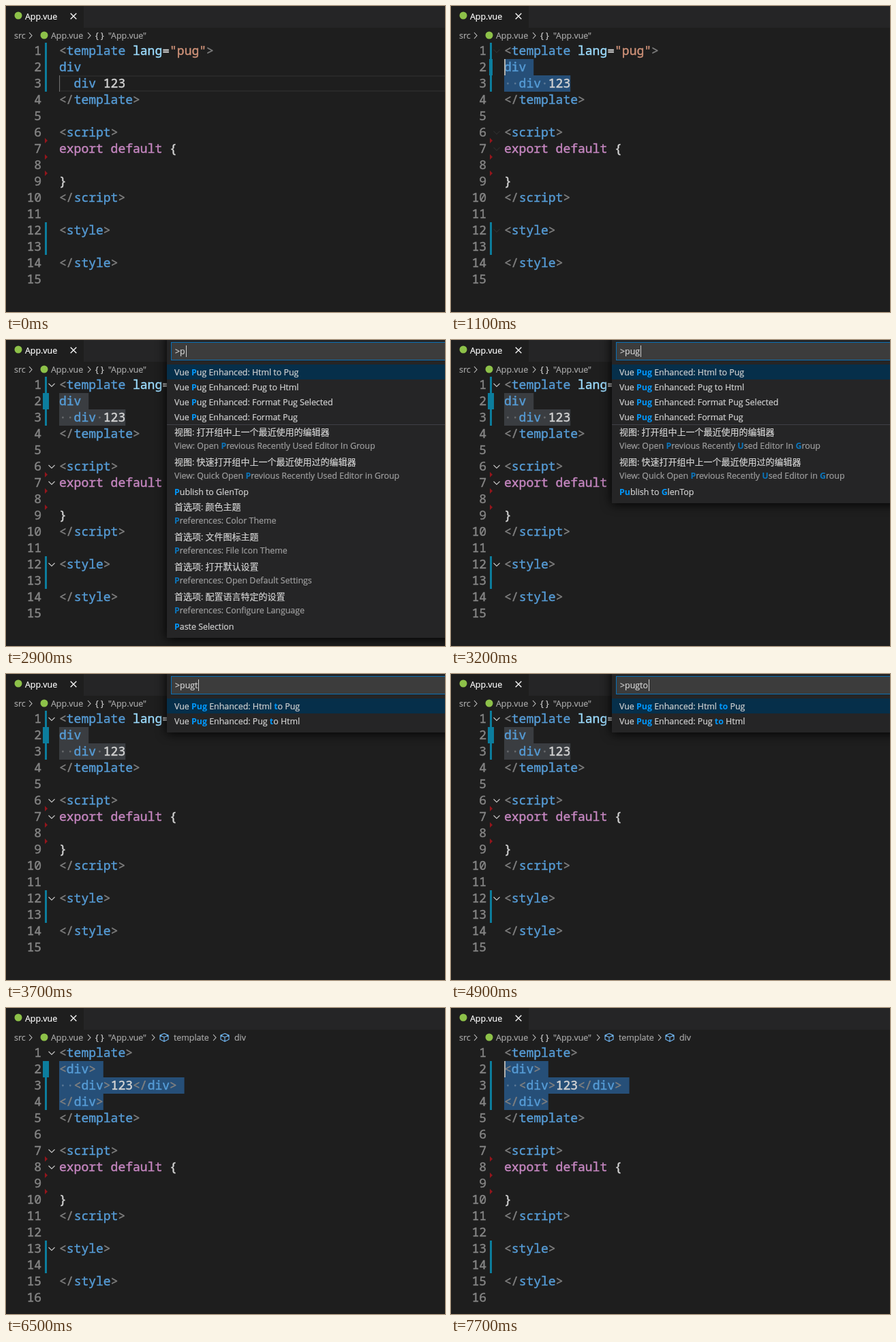
An HTML page that plays this animation: 644x450 px, repeating every 8.1 s.

```html
<!DOCTYPE html>
<html lang="en">
<head>
<meta charset="utf-8">
<title>Editor demo</title>
<style>
  html, body { margin: 0; width: 100%; height: 100%; overflow: hidden; background: #1e1e1e; }
  svg { display: block; width: 644px; height: 450px; }
  text { white-space: pre; font: 12.4px "Open Sans", "Noto Sans", "Noto Sans CJK SC", sans-serif; color: #d4d4d4; }
  text, tspan { fill: currentColor; stroke: currentColor; stroke-width: .2; }
  .cjk { font: 13px "Noto Sans CJK SC", "Noto Sans CJK", sans-serif; }
  .code, .code tspan { font: 500 18px "Noto Sans Mono", "DejaVu Sans Mono", monospace; stroke-width: .45; }
  .gray { color: #808080; } .blue { color: #569cd6; } .attr { color: #9cdcfe; } .str { color: #ce9178; }
  .key { color: #c586c0; } .plain { color: #d4d4d4; } .num { color: #858585; text-anchor: end; }
  .crumb { color: #a9a9a9; } .bright { color: #fff; }
  .hit { font-weight: 700; color: #0097fb; stroke: none; }
  .detail { opacity: .7; }
  .line { fill: none; stroke: #c5c5c5; stroke-width: 1.1; }
  .panel { filter: drop-shadow(0 1px 8px #000); fill: #252526; }
</style>
</head>
<body>
<svg viewBox="0 0 644 450"><g id="editor"></g><g id="palette"></g></svg>
<script>
const LOOP = 8100, LEFT = 78, CHAR = 10.8, ROW = 24, TOP = 54;
const editor = document.getElementById('editor');
const palette = document.getElementById('palette');

const esc = s => s.replace(/&/g, '&amp;').replace(/</g, '&lt;').replace(/>/g, '&gt;');
const rect = (x, y, w, h, fill, more = '') =>
  `<rect x="${x}" y="${y}" width="${w}" height="${h}" fill="${fill}" ${more}/>`;
const text = (x, y, body, cls = '') => `<text x="${x}" y="${y}" class="${cls}">${body}</text>`;
const span = (cls, s, dx = 0) => `<tspan class="${cls}" dx="${dx}">${esc(s)}</tspan>`;
const path = (d, more = '') => `<path class="line" d="${d}" ${more}/>`;
const cjk = s => s.replace(/[\u4e00-\u9fff]+/g, m => `<tspan class="cjk">${m}</tspan>`);
const lineTop = n => TOP + (n - 1) * ROW;
const within = (t, ranges) => ranges.some(([a, b]) => t >= a && t < b);
const clamp = v => Math.max(0, Math.min(1, v));

// Code
const open = (name, attrs = '') => span('gray', '<') + span('blue', name) + attrs + span('gray', '>');
const close = name =>
  span('gray', '<') + span('gray', '/', -.5) + span('blue', name, .5) + span('gray', '>');
const tail = [
  close('template'), '', open('script'),
  span('key', 'export default ') + span('plain', '{'), '', span('plain', '}'),
  close('script'), '', open('style'), '', close('style'), ''
];
const pugCode = [
  open('template', span('attr', ' lang') + span('plain', '=') + span('str', '"pug"')),
  span('blue', 'div'),
  span('blue', '  div') + span('plain', ' 123'),
  ...tail
];
const htmlCode = [
  open('template'), open('div'),
  '  ' + open('div') + span('plain', '123') + close('div'),
  close('div'), ...tail
];

// Selected ranges: line, first column, last column
const drag = [
  [800, [[3, 4, 9]]],
  [900, [[3, 1, 9]]],
  [1000, [[2, 2, 4], [3, 0, 9]]],
  [1100, [[2, 0, 4], [3, 0, 9]]],
  [5900, [[2, 0, 6], [3, 0, 17], [4, 0, 6]]]
];
const latest = (table, t) => table.reduce((v, [at, next]) => t >= at ? next : v, null);

function selection(t) {
  const parts = latest(drag, t) || [];
  const color = t >= 2000 && t < 5800 ? '#3a3d41' : '#264f78';
  return parts.map(([n, a, b]) =>
    rect(LEFT + a * CHAR, lineTop(n), (b - a) * CHAR, ROW, color)).join('');
}

function dots(t) {
  if (t < 900) return '';
  const cols = t < 1000 ? [1, 5] : t < 5900 ? [0, 1, 5] : [0, 1];
  return cols.map(c =>
    `<circle cx="${LEFT + (c + .5) * CHAR}" cy="${lineTop(3) + 12}" r="1.4" fill="#e3e4e2" opacity=".28"/>`).join('');
}

function gutter(t) {
  const shift = t >= 5900 ? 1 : 0;
  const [first, last] = t >= 6000 ? [2, 4] : [1, 3];
  const bar = (a, b) => rect(57, lineTop(a), 3, (b - a + 1) * ROW, '#0c7d9d');
  let out = bar(first, last) + bar(12 + shift, 13 + shift);
  if (t >= 1100 && t < 6800) {
    const w = t < 1200 ? 5 : 9;
    out += rect(58.5 - w / 2, lineTop(2), w, ROW, '#0c7d9d');
  }
  for (const n of [7, 8, 9])
    out += `<path d="M57 ${lineTop(n + shift) - 4}l4 4-4 4z" fill="#94151b"/>`;

  const fade = t < 6800 ? clamp((t - 1050) / 550) : clamp(1 - (t - 6700) / 500);
  for (const n of [1, 6 + shift, 7 + shift, 12 + shift])
    out += path(`M62.5 ${lineTop(n) + 10}l4.5 4.5 4.5-4.5`, `opacity="${fade}"`);
  return out;
}

function caret(t) {
  const at = (n, x) => rect(x, lineTop(n), 2, ROW, '#aeafad');
  if (within(t, [[600, 800]])) return at(3, 174);
  if (within(t, [[800, 1600], [5800, 6300], [6800, 7200], [7700, LOOP]])) {
    const [n, col] = latest(drag, t)[0];
    return at(n, LEFT + col * CHAR);
  }
  return '';
}

// Header
const dot = (x, y, r) => `<circle cx="${x}" cy="${y}" r="${r}" fill="#8dc149"/>`;
const arrow = x => path(`M${x - 2} 39l4 4.5-4 4.5`);
const cube = x => path(`M${x} 37.5l6 2.7v6l-6 3-6-3v-6zM${x - 6} 40.2l6 2.8 6-2.8M${x} 43v6`, 'style="stroke:#75beff"');

function header(t) {
  let out = rect(0, 0, 644, 32, '#252526') + rect(0, 0, 114, 32, '#1e1e1e') +
    dot(18, 14, 5.5) + text(28, 20, 'App.vue', 'bright') +
    path('M94.7 10.7l8.6 8.6m0-8.6l-8.6 8.6', 'style="stroke:#fff;stroke-width:1.3"') +
    text(12, 48, 'src', 'crumb') + arrow(36) + dot(56, 43, 5.5) +
    text(66, 48, 'App.vue', 'crumb') + arrow(122) +
    text(131, 47.5, '{ }') + text(150, 48, '"App.vue"', 'crumb');
  if (t >= 6500)
    out += arrow(216) + cube(232) + text(246, 48, 'template', 'crumb') +
      arrow(306) + cube(321) + text(335, 48, 'div', 'crumb');
  return out;
}

function drawEditor(t) {
  const lines = t >= 5900 ? htmlCode : pugCode;
  let out = header(t);
  if (t < 800)
    out += rect(79, 103, 570, 22, 'none', 'stroke="#282828" stroke-width="2"') +
      rect(78, 102, 1, 24, '#707070');
  out += selection(t) + dots(t) + gutter(t);
  lines.forEach((line, i) => {
    const y = lineTop(i + 1) + 18;
    out += text(52, y, i + 1, 'code num') + text(LEFT, y, line, 'code');
  });
  editor.innerHTML = out + caret(t);
}

// Command palette
const pug = ['Html to Pug', 'Pug to Html', 'Format Pug Selected', 'Format Pug']
  .map(s => ['Vue Pug Enhanced: ' + s]);
const recent = [
  pug[0], pug[1],
  ['搜索: 在文件中替换', 'Search: Replace in Files'],
  pug[2], pug[3],
  ['Emmet Live'],
  ['扩展: 禁用此工作区的所有已安装的扩展', 'Extensions: Disable All Installed Extensions for this Workspace'],
  ['开发人员: 重新加载窗口', 'Developer: Reload Window'],
  ['Vetur: Open user scaffold snippet folder'],
  ['Git: 添加远程存储库...', 'Git: Add Remote...'],
  ['开发人员: 显示正在运行的扩展', '开发人员: Show Running Extensions'],
  ['任务: 配置任务', 'Tasks: Configure Task']
];
const commands = [
  ...pug,
  ['视图: 打开组中上一个最近使用的编辑器', 'View: Open Previous Recently Used Editor In Group'],
  ['视图: 快速打开组中上一个最近使用过的编辑器', 'View: Quick Open Previous Recently Used Editor in Group'],
  ['Publish to GlenTop'],
  ['首选项: 颜色主题', 'Preferences: Color Theme'],
  ['首选项: 文件图标主题', 'Preferences: File Icon Theme'],
  ['首选项: 打开默认设置', 'Preferences: Open Default Settings'],
  ['首选项: 配置语言特定的设置', 'Preferences: Configure Language'],
  ['Paste Selection']
];
const typed = [[2000, ''], [2900, 'p'], [3100, 'pu'], [3200, 'pug'], [3700, 'pugt'], [3900, 'pugto']];

// Marks query pieces at word starts; returns null when the query does not fit.
function mark(s, query) {
  let out = '', rest = s;
  while (query) {
    let n = query.length, at = -1;
    for (; n > 0; n--) {
      at = rest.search(new RegExp('\\b' + query.slice(0, n), 'i'));
      if (at >= 0) break;
    }
    if (at < 0) return null;
    out += esc(rest.slice(0, at)) + span('hit', rest.slice(at, at + n));
    rest = rest.slice(at + n);
    query = query.slice(n);
  }
  return out + esc(rest);
}

function drawPalette(t) {
  if (t < 2000 || t >= 5800) { palette.innerHTML = ''; return; }
  const query = latest(typed, t);
  const picked = t >= 5200 ? 1 : 0;
  let y = 36, rows = '';
  (query ? commands : recent)
    .map(([label, detail]) => ({ label, detail, marked: mark(detail || label, query) }))
    .filter(item => item.marked !== null)
    .forEach(({ label, detail, marked }, i) => {
      if (i === picked) rows += rect(236, y, 408, 22, '#062f4a');
      if (query && i === pug.length) rows += rect(236, y, 408, 1, '#3f3f46');
      if (detail) {
        rows += text(247, y + 16, cjk(label)) + text(247, y + 36, cjk(marked), 'detail');
        y += 44;
      } else {
        rows += text(247, y + 16, marked);
        y += 22;
      }
    });
  palette.innerHTML = `<rect class="panel" x="236" y="-12" width="430" height="${y + 18}"/>` +
    rect(242.5, 3.5, 420, 26, '#3c3c3c', 'stroke="#0a70b5"') +
    text(248, 21, esc('>' + query), 'query') + rows;
  if (!within(t, [[2500, 2900], [4400, 4900], [5300, 5800]])) {
    const end = 249 + palette.querySelector('.query').getComputedTextLength();
    palette.insertAdjacentHTML('beforeend', rect(Math.round(end), 8, 1, 17, '#d0d0d0'));
  }
}

let shown = -1;
function frame() {
  const t = Math.floor(performance.now() % LOOP / 100) * 100;
  if (t !== shown) {
    shown = t;
    drawEditor(t);
    drawPalette(t);
  }
  requestAnimationFrame(frame);
}
frame();
</script>
</body>
</html>
```
